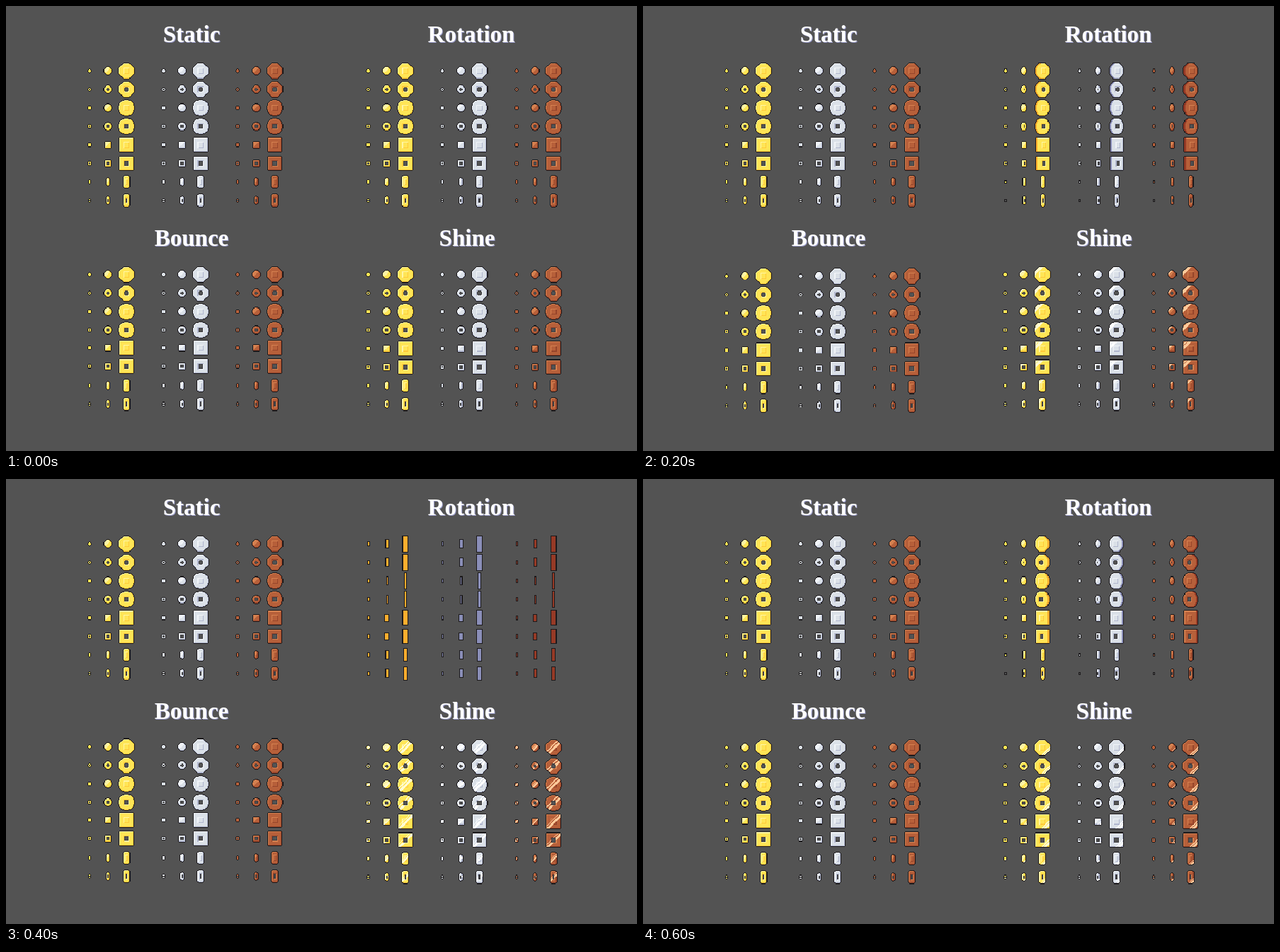
Animation of 891 by 629 pixels, one loop 700 ms. Source, as an HTML page with a canvas:

```html
<!DOCTYPE html>
<html lang="en">
<head>
<meta charset="utf-8">
<title>Coin sheet</title>
<style>
  html, body { margin: 0; width: 100%; height: 100%; overflow: hidden; background: #535353; }
  canvas { position: absolute; left: 0; top: 0; }
  h2 {
    position: absolute; margin: 0; transform: translateX(-50%);
    font: bold 33px/33px "Liberation Serif", "Noto Serif", serif;
    color: #fff; text-shadow: 1px 1px 0 #9a9cc9; white-space: nowrap;
  }
</style>
</head>
<body>
<canvas id="stage" width="891" height="629"></canvas>
<h2 style="left:262px;top:24px">Static</h2>
<h2 style="left:657px;top:24px">Rotation</h2>
<h2 style="left:262px;top:312px">Bounce</h2>
<h2 style="left:651px;top:312px">Shine</h2>
<script>
const BG = '#535353', INK = '#1c1a1c', HOLE_RIM = '#3f3f42';
const STEPS = 7, STEP_MS = 100;

// The sheet is drawn on a small pixel grid and enlarged without smoothing.
const SHEET_W = 818, SHEET_H = 578, SCALE = 891 / 817, PITCH = 24;
const LEFT = 108, RIGHT = 469, UPPER = 84, LOWER = 348;

const METALS = [
  { base: '#ffe556', light: '#fff5a4', dark: '#ffc93a', side: '#ffae2e', shine: '#fffbd2' },
  { base: '#dbe1e8', light: '#f1f4f8', dark: '#b0b6ce', side: '#8b8fb9', shine: '#ffffff' },
  { base: '#b7603a', light: '#d58150', dark: '#96452b', side: '#963a26', shine: '#ffc99a' }
];

// Each list runs small, medium, large; rim is the width seen edge-on.
const SHAPES = [
  { kind: 'octagon', w: [6, 12, 22], h: [6, 12, 22], rim: [3, 5, 8] },
  { kind: 'circle', w: [6, 12, 22], h: [6, 12, 22], rim: [3, 3, 4] },
  { kind: 'square', w: [6, 10, 20], h: [6, 10, 20], rim: [3, 6, 8] },
  { kind: 'bar', w: [4, 6, 10], h: [6, 12, 18], rim: [3, 5, 6] }
];
const OCTAGON_CUT = [1.15, 1.2, 1.33];

// turn: 0 face-on, 1 slight, 2 strong, 3 edge-on; negative shows the other side
const TURN = [0, 0, 1, 2, 3, -2, -1];
const BOUNCE = [0, 1, 2, 2, -1, 1, 0];

function inFace(kind, size, u, v, w, h) {
  const x = Math.abs(u), y = Math.abs(v);
  if (x > w / 2 || y > h / 2) return false;
  const a = x / (w / 2), b = y / (h / 2);
  if (kind === 'circle') return a * a + b * b <= 1;
  if (kind === 'octagon') return a + b <= OCTAGON_CUT[size];
  const corner = kind === 'bar' && w >= 6 ? 2.5 : 1.5;
  return w / 2 - x + h / 2 - y >= corner;
}

function inShine(along) {
  return Math.abs(along) < 0.22 || Math.abs(along + 0.45) < 0.08;
}

function faceColor(coin, u, v, w, h, squeeze, rim) {
  const { shape, size, hole, metal, shine } = coin;
  const x = Math.abs(u), y = Math.abs(v);
  const bar = shape.kind === 'bar';
  const hx = Math.max(0.5, (bar ? [0.5, 0.5, 1] : [0.5, 1.5, 3])[size] * squeeze);
  const hy = [0.5, 1.5, 3][size];

  if (hole && x <= hx && y <= hy) {
    const atX = x > hx - 1, atY = y > hy - 1;
    const cutCorner = shape.kind === 'octagon' && size > 0 && atX && atY;
    if (!cutCorner) return size > 0 && (atX || atY) ? HOLE_RIM : BG;
  }
  if (shine !== null && inShine((u + v) / ((w + h) / 4) - shine)) return metal.shine;
  if (size === 0) return metal.base;
  if (size === 2 && x <= hx + 1 && y <= hy + 1 && (x > hx || y > hy)) {
    const upperLeft = u < -hx || v < -hy;
    return upperLeft !== hole ? metal.light : metal.dark;
  }
  if (rim) return metal[rim];
  if (size === 1 && !hole && u + v < 0) return metal.light;
  return metal.base;
}

const sprites = new Map();

function sprite(coin) {
  const { shape, size, metal, turn } = coin;
  const key = [shape.kind, size, coin.hole, metal.base, turn, coin.shine].join();
  if (sprites.has(key)) return sprites.get(key);

  const depth = Math.abs(turn), edgeOn = depth === 3;
  const roomy = size === 2 && shape.kind !== 'bar';
  const squeeze = [1, roomy ? 0.78 : 0.62, roomy ? 0.6 : 0.45, 1][depth];
  const side = edgeOn || !depth ? 0
    : depth === 2 ? [1, 2, roomy ? 5 : 2][size]
    : roomy ? 3 : 1;
  const w = Math.round(shape.w[size] * squeeze), h = shape.h[size];
  const width = edgeOn ? shape.rim[size] : w + side;
  const offset = turn > 0 ? side : 0;

  const face = (x, y) =>
    inFace(shape.kind, size, x - offset - (w - 1) / 2, y - (h - 1) / 2, w, h);
  const inside = (x, y) => {
    if (x < 0 || y < 0 || x >= width || y >= h) return false;
    if (edgeOn) return true;
    for (let k = 0; k <= side; k++) if (face(x + offset - k, y)) return true;
    return false;
  };
  const outline = (x, y) => inside(x, y) &&
    !(inside(x - 1, y) && inside(x + 1, y) && inside(x, y - 1) && inside(x, y + 1));

  const canvas = document.createElement('canvas');
  canvas.width = width;
  canvas.height = h;
  const g = canvas.getContext('2d');
  for (let y = 0; y < h; y++) {
    for (let x = 0; x < width; x++) {
      if (!inside(x, y)) continue;
      if (outline(x, y)) g.fillStyle = INK;
      else if (edgeOn || !face(x, y)) g.fillStyle = metal.side;
      else {
        const rim = outline(x + 1, y) || outline(x, y + 1) ? 'dark'
          : outline(x - 1, y) || outline(x, y - 1) ? 'light' : '';
        const u = x - offset - (w - 1) / 2, v = y - (h - 1) / 2;
        g.fillStyle = faceColor(coin, u, v, w, h, squeeze, rim);
      }
      g.fillRect(x, y, 1, 1);
    }
  }
  sprites.set(key, canvas);
  return canvas;
}

function drawPanel(g, left, top, { turn = 0, shine = null, shift = () => 0 }) {
  for (let row = 0; row < 8; row++) {
    const shape = SHAPES[row >> 1];
    METALS.forEach((metal, m) => {
      for (let size = 0; size < 3; size++) {
        const img = sprite({ shape, size, metal, hole: row % 2 === 1, turn, shine });
        const x = left + PITCH * (4 * m + size) - img.width / 2;
        const y = top + PITCH * row - img.height / 2;
        const dy = shift(shape);
        // Small coins lose their lowest row when they touch down.
        const h = img.height - (dy === 2 && size < 2 ? 1 : 0);
        g.drawImage(img, 0, 0, img.width, h, Math.round(x), y + dy, img.width, h);
      }
    });
  }
}

function buildStep(step) {
  const canvas = document.createElement('canvas');
  canvas.width = SHEET_W;
  canvas.height = SHEET_H;
  const g = canvas.getContext('2d');
  g.fillStyle = BG;
  g.fillRect(0, 0, SHEET_W, SHEET_H);

  // Squares ride one pixel higher near the top of the bounce.
  const high = BOUNCE[step] <= 0;
  const shift = shape => BOUNCE[step] - (high && shape.kind === 'square' ? 1 : 0);
  const shine = step < 2 ? null : -1 + 0.57 * (step - 2);

  drawPanel(g, LEFT, UPPER, {});
  drawPanel(g, RIGHT, UPPER, { turn: TURN[step] });
  drawPanel(g, LEFT, LOWER, { shift });
  drawPanel(g, RIGHT, LOWER, { shine });
  return canvas;
}

const stage = document.getElementById('stage').getContext('2d');
stage.imageSmoothingEnabled = false;
const views = Array.from({ length: STEPS }, (_, i) => buildStep(i));
const start = performance.now();
let shown = -1;

function tick() {
  const step = Math.floor((performance.now() - start) / STEP_MS) % STEPS;
  if (step !== shown) {
    stage.drawImage(views[step], 0, 0, SHEET_W * SCALE, SHEET_H * SCALE);
    shown = step;
  }
  requestAnimationFrame(tick);
}
tick();
</script>
</body>
</html>
```
